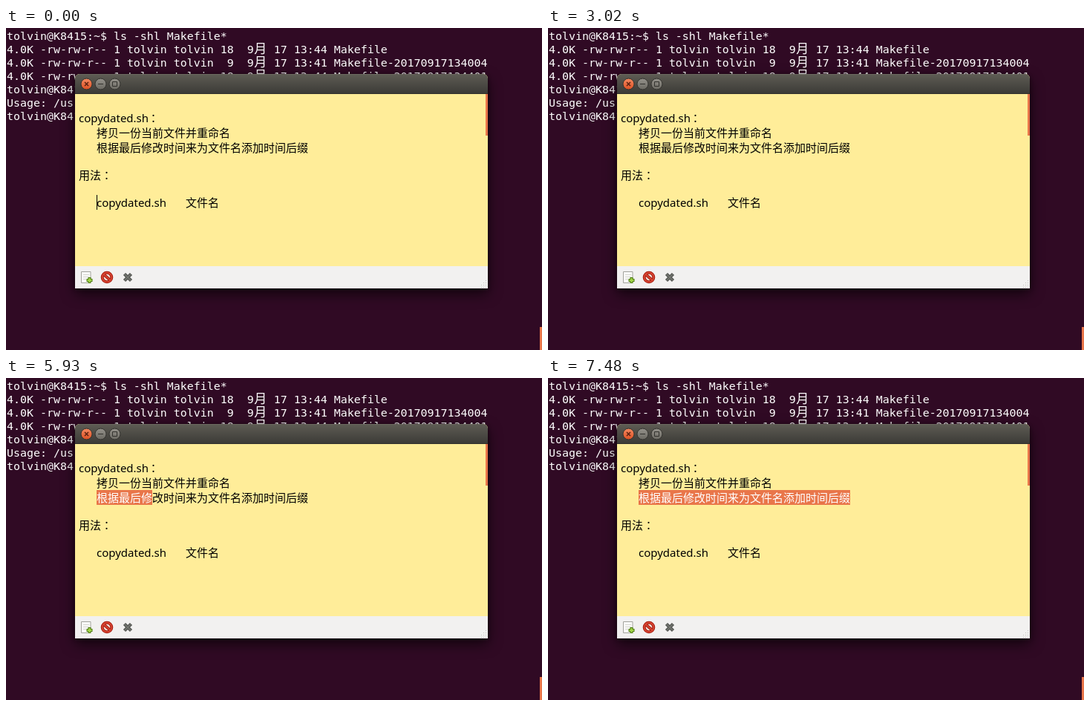
Recreate the animation shown at these times as an HTML page. Size 722 by 434 pixels, loop 8 s.

```html
<!DOCTYPE html>
<html lang="zh-CN">
<head>
<meta charset="utf-8">
<title>Sticky note</title>
<style>
  html, body { margin: 0; width: 100%; height: 100%; overflow: hidden; background: #300a24; }
  .stage { position: relative; width: 722px; height: 434px; overflow: hidden; background: #300a24; }
  .stage > * { position: absolute; }
  svg { left: 0; top: 0; width: 722px; height: 434px; }

  .term { left: 1px; top: 2px; margin: 0; color: #fff;
    font: 14.95px/18px "DejaVu Sans Mono", monospace; }
  .term i { display: inline-block; width: 18px; line-height: 0; text-align: center;
    font: normal 17px/0 "Noto Sans CJK SC", "Noto Sans CJK", sans-serif; }

  .window { left: 93px; top: 62px; width: 556px; height: 289px; border-radius: 6px 6px 0 0;
    background: #ffed99; box-shadow: 0 7px 18px rgba(0, 0, 0, .65), 0 1px 4px rgba(0, 0, 0, .5); overflow: hidden; }
  .title { height: 27px; box-sizing: border-box; background: linear-gradient(#5d5b53, #3c3b37);
    border-top: 1px solid #6b695f; border-bottom: 1px solid #32312d; }
  .tools { position: absolute; bottom: 0; width: 100%; height: 30px; background: #f2f1f0; }
  .bar { width: 3px; background: #e9764a; }

  .note { font: 15px "Noto Sans", "Noto Sans CJK SC", "Noto Sans CJK", sans-serif; }
  .wide { font-family: "Noto Sans CJK JP", "Noto Sans CJK", sans-serif; }
  .pick { background: #e9764a; fill: #fff; animation: pick 8s step-end infinite; }
  .caret { left: 0; top: 0; width: 1px; height: 20px; background: #000; animation: caret 8s step-end infinite; }

  @keyframes caret {
    0% { transform: translate(122px, 225px); }
    6.25% { transform: translate(-9px, 0); }
    11.25% { transform: translate(122px, 131px); }
    18.25% { transform: translate(98px, 111px); }
    21.125% { transform: translate(-9px, 0); }
    41% { transform: translate(122px, 131px); }
    43% { transform: translate(-9px, 0); }
    62.75% { transform: translate(137px, 151px); }
    65.75%, 100% { transform: translate(-9px, 0); }
  }
  /* word, then a whole line, then one character at a time */
  @keyframes pick {
    0%, 37.75%, 62.75% { clip-path: inset(434px 0 0 0); }
    24.25% { clip-path: inset(111px 550px 303px 98px); }
    43% { clip-path: inset(131px 420px 283px 122px); }
    70.875% { clip-path: inset(151px 585px 263px 122px); }
    71.75% { clip-path: inset(151px 570px 263px 122px); }
    72.5% { clip-path: inset(151px 555px 263px 122px); }
    73.375% { clip-path: inset(151px 540px 263px 122px); }
    74.125% { clip-path: inset(151px 525px 263px 122px); }
    75.375% { clip-path: inset(151px 510px 263px 122px); }
    76.5% { clip-path: inset(151px 495px 263px 122px); }
    77.5% { clip-path: inset(151px 480px 263px 122px); }
    78.625% { clip-path: inset(151px 465px 263px 122px); }
    79.625% { clip-path: inset(151px 450px 263px 122px); }
    80.25% { clip-path: inset(151px 435px 263px 122px); }
    80.875% { clip-path: inset(151px 420px 263px 122px); }
    81.5% { clip-path: inset(151px 405px 263px 122px); }
    82.75% { clip-path: inset(151px 390px 263px 122px); }
    84.5% { clip-path: inset(151px 375px 263px 122px); }
    86.75% { clip-path: inset(151px 360px 263px 122px); }
    88.375% { clip-path: inset(151px 345px 263px 122px); }
    90% { clip-path: inset(151px 330px 263px 122px); }
    93.5%, 100% { clip-path: inset(151px 315px 263px 122px); }
  }
</style>
</head>
<body>
<div class="stage">
<pre class="term">tolvin@K8415:~$ ls -shl Makefile*
4.0K -rw-rw-r-- 1 tolvin tolvin 18  9<i>月</i> 17 13:44 Makefile
4.0K -rw-rw-r-- 1 tolvin tolvin  9  9<i>月</i> 17 13:41 Makefile-20170917134004
4.0K -rw-rw-r-- 1 tolvin tolvin 18  9<i>月</i> 17 13:44 Makefile-20170917134401
tolvin@K8415:~$
Usage: /usr
tolvin@K8415:~$</pre>
  <div class="bar" style="left:719px;top:403px;height:31px"></div>

  <div class="window"><div class="title"></div><div class="tools"></div></div>
  <div class="bar" style="left:646px;top:89px;height:56px"></div>

  <svg viewBox="0 0 722 434">
    <defs>
      <linearGradient id="hot" x2="0" y2="1"><stop stop-color="#f58a62"/><stop offset="1" stop-color="#dd4f22"/></linearGradient>
      <linearGradient id="dim" x2="0" y2="1"><stop stop-color="#94918a"/><stop offset="1" stop-color="#6b6962"/></linearGradient>
    </defs>

    <g stroke="#33322e">
      <circle cx="108.5" cy="75.5" r="7.5" fill="url(#hot)"/>
      <circle cx="127.5" cy="75.5" r="7.5" fill="url(#dim)"/>
      <circle cx="146.5" cy="75.5" r="7.5" fill="url(#dim)"/>
      <path d="M106 73l5 5m0-5l-5 5" stroke="#5a2010" stroke-width="1.5"/>
      <path d="M124 75.5h7M143.5 72.5h6v6h-6z" fill="none"/>
    </g>

    <path d="M101.5 328.5h12.500v11l-4 4h-8.500z" fill="#fafaf8" stroke="#a3a39d"/>
    <path d="M104 332.500h8m-8 3h8m-8 3h4" stroke="#d5d5d0"/>
    <path d="M112.500 336v8m-4-4h8" stroke="#4c7a12" stroke-width="4"/>
    <path d="M112.500 337v6m-3-3h6" stroke="#a5d84a" stroke-width="2"/>

    <g fill="none" stroke="#a51d10" stroke-width="4">
      <circle cx="136" cy="336" r="6.3" fill="#f1e3dc"/>
      <path d="M131.500 332l9 8"/>
      <g stroke="#d64330" stroke-width="2"><circle cx="136" cy="336" r="6.300"/><path d="M131.500 332l9 8"/></g>
    </g>

    <path d="M159.500 331.500l9 9m0-9l-9 9" stroke="#555753" stroke-width="4.500"/>
    <path d="M160 332l8 8m0-8l-8 8" stroke="#777a74" stroke-width="1.500"/>

    <path d="M646.500 340v10m-3-7v7m-3-4v4" stroke="#c3c1bd" stroke-dasharray="1 2"/>

    <g id="note" class="note">
      <text x="98" y="127">copydated.sh</text>
      <text x="191" y="127" class="wide">：</text>
      <text x="122" y="147">拷贝一份当前文件并重命名</text>
      <text x="122" y="167">根据最后修改时间来为文件名添加时间后缀</text>
      <text x="98" y="204">用法</text>
      <text x="128" y="204" class="wide">：</text>
      <text x="122" y="241">copydated.sh</text>
      <text x="242" y="241">文件名</text>
    </g>
  </svg>

  <svg class="pick" viewBox="0 0 722 434"><use href="#note"/></svg>
  <div class="caret"></div>
</div>
</body>
</html>
```
